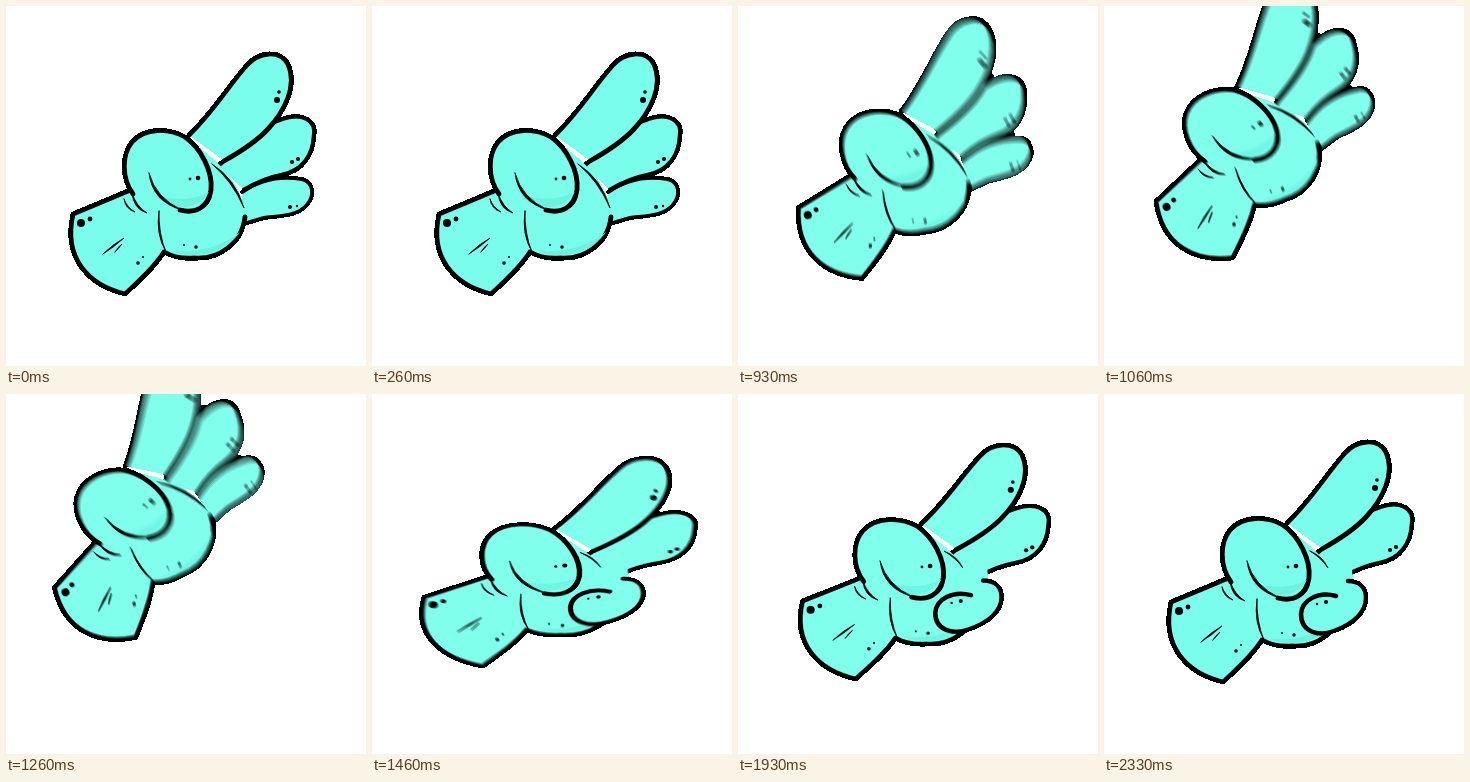
Recreate the animation shown at these times as an HTML page with a canvas. Size 360 by 360 pixels, loop 2.4 s.

```html
<!DOCTYPE html>
<html>
<head>
<meta charset="utf-8">
<title>Hand</title>
<style>
html, body { margin: 0; width: 100%; height: 100%; overflow: hidden; background: #fff; }
canvas { display: block; width: 100vmin; height: 100vmin; }
</style>
</head>
<body>
<canvas id="stage" width="360" height="360"></canvas>
<script>
const SIZE = 360, LOOP = 2400, STEPS = 36, SAMPLES = 9, SHUTTER = 0.4;
const SKIN = '#7afdea', SHADE = '#6bf1dd', INK = '#000';
const LIFT = 9, DROP = 18.6, LAND = 20.3, REST = 32, SWITCH = 21;

const view = document.getElementById('stage').getContext('2d');
const layer = document.createElement('canvas');
layer.width = layer.height = SIZE;
const g = layer.getContext('2d', { willReadFrequently: true });

const clamp = u => Math.min(1, Math.max(0, u));
const cubicInOut = u => u < 0.5 ? 4 * u ** 3 : 1 - 4 * (1 - u) ** 3;
const smooth = u => u * u * (3 - 2 * u);

const P = d => new Path2D(d);
const index = P('M183 129C208 105 222 80 241 59C252 46 274 43 282 58C292 80 278 106 262 123C250 136 234 146 218 155');
const middle = P('M212 160C236 138 258 118 276 113C296 106 311 114 308 130C307 150 296 165 276 169C260 172 248 178 238 184');
const pinky = P('M236 186C256 172 278 170 296 173C308 176 309 190 301 199C291 211 272 210 258 212Q244 216 238 218');
const folded = P('M232 202C214 197 198 206 197 220C197 238 214 243 230 237C250 230 262 218 262 204C262 192 254 187 244 187');
const bridge = P('M212 160L248 176L250 194L225 205Z');
const body = P('M239 211C236 238 212 254 188 252C176 253 165 250 158 246C148 262 132 276 119 288C82 279 57 252 67 208L122 185');
const bodyFill = P('M180 132C215 156 238 180 239 211L122 185Z');
const thumb = P('M127 188C115 172 116 148 126 136C139 121 163 122 179 131C195 142 207 166 205 184C202 202 189 208 174 204');
const tail = P('M174 204Q155 200 127 188');
const thumbShade = P('M148 189C164 204 190 207 203 186Q180 198 148 189Z');
const palmShade = P('M166 245C192 256 222 244 234 226C218 239 196 247 166 245Z');

function fill(path, color = SKIN) {
  g.fillStyle = color;
  g.fill(path);
}

function line(path, width) {
  g.lineWidth = width;
  g.stroke(path);
}

function shape(path, width) {
  fill(path);
  line(path, width);
}

// Tapered stroke: a curve out and a bulged curve back
function crease(x0, y0, cx, cy, x1, y1, w) {
  const len = Math.hypot(x1 - x0, y1 - y0);
  const nx = (y1 - y0) / len * w, ny = (x0 - x1) / len * w;
  const path = P(`M${x0} ${y0}Q${cx + nx} ${cy + ny} ${x1} ${y1}Q${cx - nx} ${cy - ny} ${x0} ${y0}Z`);
  fill(path, INK);
  line(path, 0.8);
}

// A dot and its smaller companion
function dots(x, y, r, dx, dy, small = r * 0.6) {
  g.fillStyle = INK;
  for (const [px, py, pr] of [[x, y, r], [x + dx, y + dy, small]]) {
    g.beginPath();
    g.arc(px, py, pr, 0, 7);
    g.fill();
  }
}

function drawHand(two) {
  g.strokeStyle = INK;
  g.lineCap = g.lineJoin = 'round';
  if (!two) shape(pinky, 4);
  shape(middle, 4.5);
  shape(index, 4.8);
  fill(bodyFill);
  if (two) fill(bridge);
  shape(body, 4.8);
  fill(palmShade, SHADE);
  if (two) {
    shape(folded, 4.5);
    crease(203, 206, 186, 226, 214, 241, 2);
    crease(206, 157, 218, 163, 224, 174, 1.2);
    dots(222, 208, 2, -9, 2);
  } else {
    crease(206, 158, 228, 174, 238, 202, 2);
    dots(284, 201, 2, 7, -1);
  }
  fill(tail);
  shape(thumb, 4.8);
  fill(thumbShade, SHADE);
  crease(204, 172, 212, 206, 176, 205, 2.5);
  crease(143, 167, 148, 194, 176, 204, 2.5);
  crease(126, 187, 129, 202, 141, 207, 2);
  crease(118, 193, 120, 202, 129, 206, 1.2);
  crease(153, 205, 151, 228, 160, 246, 1.5);
  crease(97, 248, 107, 240, 118, 232, 1.5);
  crease(109, 246, 112, 242, 116, 238, 0.8);
  dots(75, 217, 4, 9, -4);
  dots(132, 257, 1.8, 5, -6);
  dots(190, 241, 1.7, -12, -2);
  dots(192, 172, 2.3, -8, 1);
  dots(271, 94, 3, 2, -8);
  dots(286, 156, 2.1, 6, -3, 2.1);
}

function poseAt(step) {
  const lift = cubicInOut(clamp((step - LIFT) / 11.5)) * (1 - smooth(clamp((step - DROP) / 3)));
  const x = step - LAND;
  const wobble = x > 0 && step < REST
    ? 0.675 * Math.exp(-0.38 * x) * Math.sin(Math.PI * (x / 5.5) ** 1.85) : 0;
  return { lift, sx: 1 + wobble, sy: (1 + wobble) ** -1.2 };
}

function drawPose(step, two) {
  const { lift, sx, sy } = poseAt(step);
  g.setTransform(1, 0, 0, 1, 0, 0);
  g.clearRect(0, 0, SIZE, SIZE);
  g.translate(186 + 4 * lift * lift, 169 + 2 * lift * lift);
  g.scale(sx, sy);
  g.translate(-166, 80);
  g.rotate(-27 * lift * Math.PI / 180);
  g.translate(-20, -249);
  drawHand(two);
}

// Averages sub-steps for motion blur, then cuts the silhouette hard
function render(step) {
  view.clearRect(0, 0, SIZE, SIZE);
  const moving = step > LIFT && step < REST;
  const count = moving ? SAMPLES : 1;
  view.globalCompositeOperation = 'lighter';
  view.globalAlpha = 1 / count;
  for (let i = 0; i < count; i++) {
    drawPose(step + ((i + 0.5) / count - 0.5) * SHUTTER, step >= SWITCH);
    view.drawImage(layer, 0, 0);
  }
  const image = view.getImageData(0, 0, SIZE, SIZE);
  for (let i = 3; i < image.data.length; i += 4) image.data[i] = image.data[i] > 127 ? 255 : 0;
  view.putImageData(image, 0, 0);
}

let shown = -1;
function tick() {
  const t = performance.now() % LOOP;
  const step = Math.floor((t + 7) * STEPS / LOOP) % STEPS;
  if (step !== shown) render(shown = step);
  requestAnimationFrame(tick);
}
tick();
</script>
</body>
</html>
```
